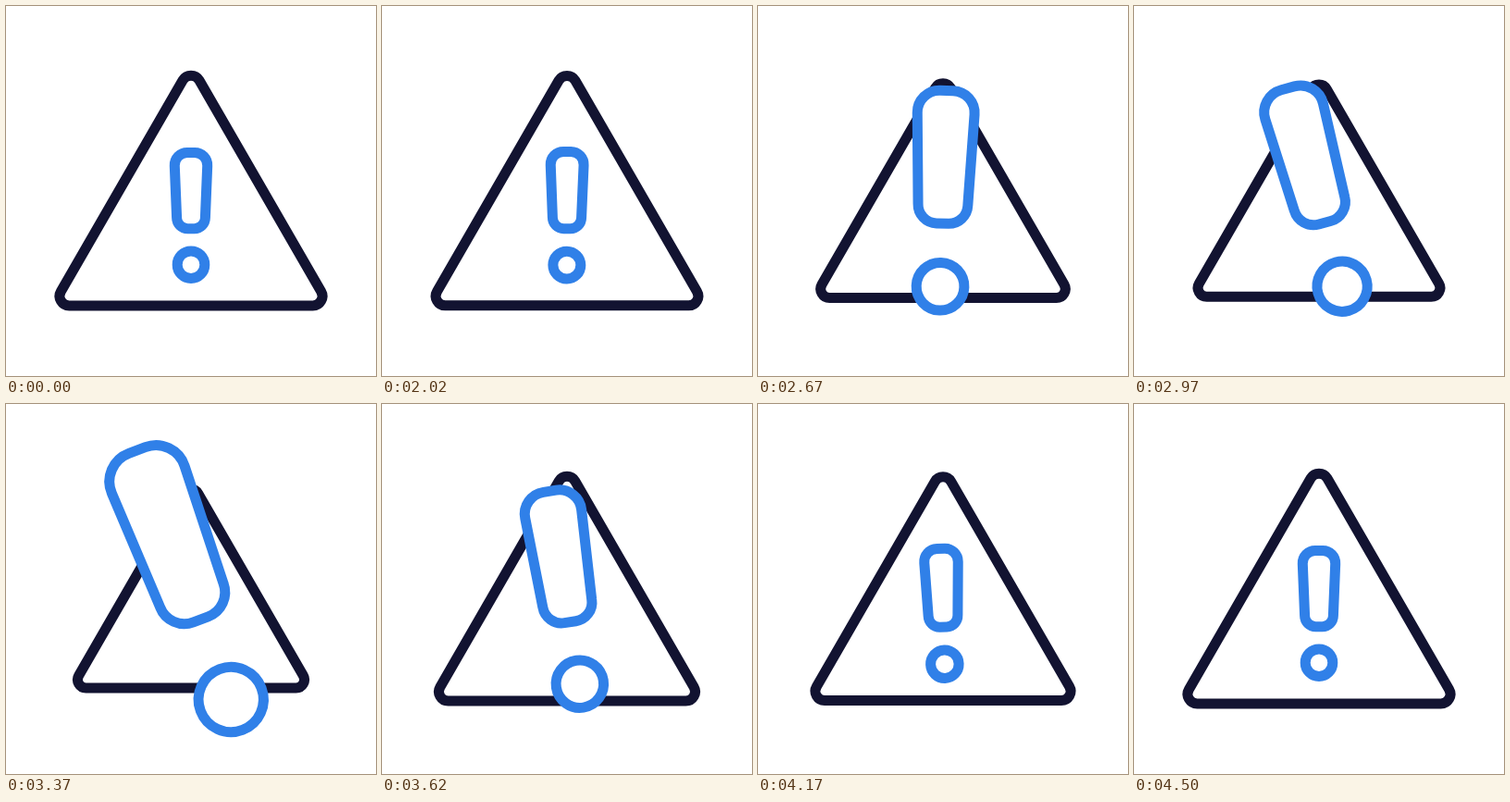
An HTML page without scripts for the animation above (4520 ms loop, 400 by 400 pixels).

```html
<!DOCTYPE html>
<html lang="en">
<head>
<meta charset="utf-8">
<title>Warning icon</title>
<style>
  @property --size { syntax: "<number>"; inherits: false; initial-value: 1; }
  @property --lift { syntax: "<length>"; inherits: false; initial-value: 0px; }
  @property --tilt { syntax: "<angle>"; inherits: false; initial-value: 0deg; }

  html, body { margin: 0; width: 100%; height: 100%; overflow: hidden; background: #fff; }
  svg { display: block; width: 100vw; height: 100vh; }

  g {
    animation: 4.52s cubic-bezier(.33, 0, .67, 1) infinite;
    fill: #fff;
    stroke-width: 11;
  }
  path, circle { vector-effect: non-scaling-stroke; }

  .sign {
    stroke: #121331;
    transform: translate(200px, 199.75px) scale(var(--size));
    animation-name: breathe;
  }
  .mark {
    stroke: #3080e8;
    transform: translate(200px, calc(228px - var(--lift))) rotate(var(--tilt)) scale(var(--size));
    animation-name: leap, swing;
  }

  /* Rest, swing right, dip, swing left, rebound, settle, rest */
  @keyframes breathe {
    0%, 44.2%, 99.6%, to { --size: 1; }
    53.9%, 75.9% { --size: .861; }
    60.7% { --size: .943; }
    85.1% { --size: 1.123; }
    92.3% { --size: .972; }
  }
  @keyframes leap {
    0%, 44.2%, 99.6%, to { --size: 1; --lift: 0px; }
    53.9%, 75.9% { --size: 2.39; --lift: 23.6px; }
    60.7% { --size: 1.64; --lift: 13.6px; }
    85.1% { --size: .9; --lift: 2px; }
    92.3% { --size: 1.03; --lift: 0px; }
  }
  @keyframes swing {
    0%, 44.2%, 99.6%, to { --tilt: 0deg; }
    53.9% { --tilt: 19.8deg; animation-timing-function: cubic-bezier(.24, 0, .12, 1); }
    75.9% { --tilt: -20.7deg; }
    85.1% { --tilt: 6.4deg; }
    92.3% { --tilt: -2deg; }
  }
</style>
</head>
<body>
<svg viewBox="0 0 400 400">
  <g class="sign">
    <path d="M-8.9 -119.4L-140.6 108.8A10.3 10.3 0 0 0 -131.7 124.25H131.7A10.3 10.3 0 0 0 140.6 108.8L8.9 -119.4A10.3 10.3 0 0 0 -8.9 -119.4Z"/>
  </g>
  <g class="mark">
    <path d="M-4 -69.6H4A13.7 13.7 0 0 1 17.7 -55.3L15.4 1A11.8 11.8 0 0 1 3.6 12.7H-3.6A11.8 11.8 0 0 1 -15.4 1L-17.7 -55.3A13.7 13.7 0 0 1 -4 -69.6Z"/>
    <circle cy="51.7" r="14.8"/>
  </g>
</svg>
</body>
</html>
```
